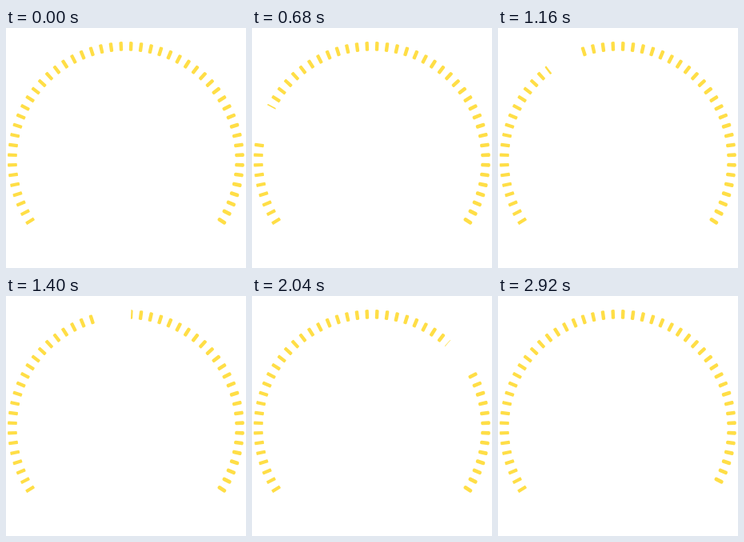
These frames come from a looping animation (300x300 px, 2960 ms). An HTML page with a canvas:

```html
<!DOCTYPE html>
<html lang="en">
<head>
<meta charset="utf-8">
<title>Dashed arc</title>
<style>
  html, body { margin: 0; height: 100%; overflow: hidden; background: #fff; }
  canvas { display: block; }
</style>
</head>
<body>
<canvas id="stage" width="300" height="300"></canvas>
<script>
const ctx = document.getElementById('stage').getContext('2d');
const LOOP = 2960, TICK = 40;
const CX = 150, CY = 165, INNER = 136.3, OUTER = 148;
const COUNT = 50, GAP = 3.65, SPEED = 0.018; // gap in dashes, speed in dashes per ms

// Canvas angle of a (fractional) dash index, clockwise from lower left
const angle = i => (-212.5 + 5 * i) * Math.PI / 180;

function drawDash(i) {
  const width = 4.1 + i * 0.012;
  ctx.save();
  ctx.translate(CX, CY);
  ctx.rotate(angle(i));
  ctx.beginPath();
  ctx.roundRect(INNER, -width / 2, OUTER - INNER, width, 0.8 + i * 0.024);
  ctx.fill();
  ctx.restore();
}

function draw(time) {
  ctx.fillStyle = '#fff';
  ctx.fillRect(0, 0, 300, 300);
  ctx.fillStyle = '#ffde46';
  for (let i = 0; i < COUNT; i++) drawDash(i);

  // White sweep that hides the dashes it passes
  const head = time * SPEED - 0.2;
  ctx.strokeStyle = '#fff';
  ctx.lineWidth = 18;
  ctx.beginPath();
  ctx.arc(CX, CY, 142, angle(head - GAP), angle(head));
  ctx.stroke();
}

function frame() {
  const time = performance.now() % LOOP;
  draw(Math.floor(time / TICK) * TICK);
  requestAnimationFrame(frame);
}
frame();
</script>
</body>
</html>
```
